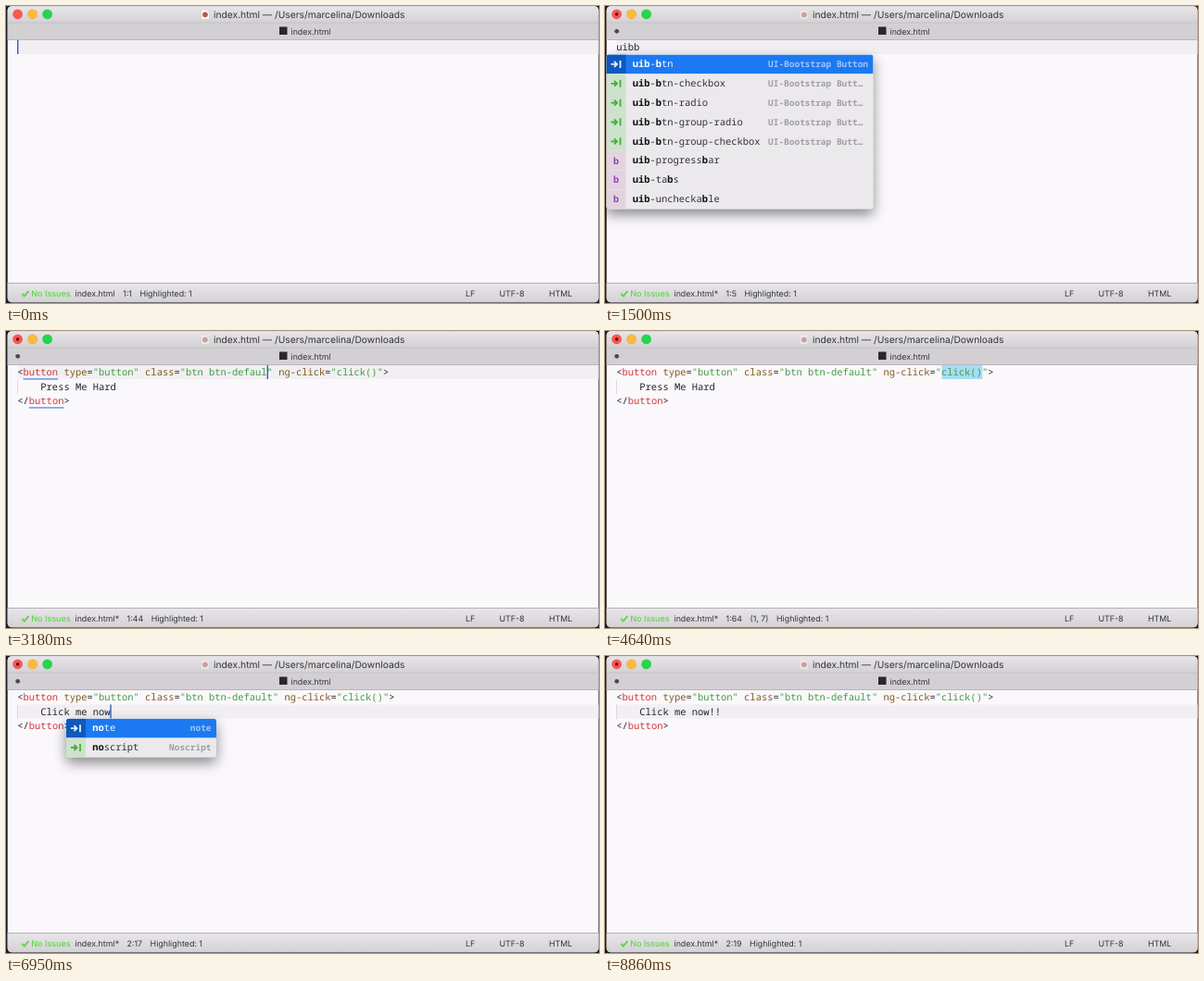
An HTML page that plays this animation: 640x321 px, repeating every 8900 ms.

```html
<!DOCTYPE html>
<html lang="en">
<head>
<meta charset="utf-8">
<title>Editor snippet demo</title>
<style>
  html, body { margin: 0; width: 100%; height: 100%; overflow: hidden; background: #1d1b1d; }
  svg { display: block; width: 640px; height: 321px; }
  text { white-space: pre; text-rendering: geometricPrecision; fill: #353337; font: 8.85px Inter, sans-serif; }
  .title { font-size: 10.25px; }
  .ok { font-size: 9px; font-weight: 500; fill: #5dd64b; }
  .code, .name { font: 500 10.45px "Noto Sans Mono", monospace; fill: #242328; }
  .tag { fill: #d2363a; }
  .attr { fill: #82591d; }
  .str { fill: #429c45; }
  .name { fill: #333136; }
  .name .hit { font-weight: 700; fill: #111; }
  .label { font: 600 9.47px "Noto Sans Mono", monospace; fill: #a19fa3; text-anchor: end; }
  .on .name { fill: #eef5ff; }
  .on .name .hit { fill: #fff; }
  .on .label { fill: #9cc5fa; }
  .letter { font: 700 10px "Noto Sans Mono", monospace; fill: #8a45b4; text-anchor: middle; }
  .panel { fill: #ebe9ec; filter: drop-shadow(0 6px 7px rgba(0, 0, 0, .45)); }
  .rows { clip-path: inset(0 round 3px); }
  .arrow { fill: none; stroke-width: 1.8; }
  .dirty { visibility: hidden; }
  .edited .dirty { visibility: visible; }
  .edited #doc { opacity: .45; }
</style>
</head>
<body>
<svg id="stage" viewBox="0 0 640 321">
  <defs>
    <linearGradient id="bar" x2="0" y2="1">
      <stop stop-color="#e8e6e8"/><stop offset="1" stop-color="#d3d1d3"/>
    </linearGradient>
    <clipPath id="window"><rect x="1.7" y=".3" width="637.8" height="320" rx="4.5"/></clipPath>
  </defs>
  <rect width="640" height="321" fill="#1d1b1d"/>
  <g clip-path="url(#window)">
    <rect width="640" height="321" fill="#faf8fb"/>
    <rect width="640" height="18" fill="url(#bar)"/>
    <rect y="18" width="640" height="18.5" fill="#d2d0d3"/>
    <rect y="17.7" width="640" height=".7" fill="#bebcbf"/>
    <rect y="36" width="640" height="1" fill="#b9b7ba"/>
    <rect y="299.5" width="640" height="21.5" fill="url(#bar)"/>
    <rect y="299" width="640" height="1" fill="#b3b1b4"/>
  </g>
  <g stroke-width=".5">
    <circle cx="12.6" cy="8.9" r="5" fill="#fc5652" stroke="#df4340"/>
    <circle cx="28.6" cy="8.9" r="5" fill="#fdbb38" stroke="#de9f34"/>
    <circle cx="44.6" cy="8.9" r="5" fill="#22d749" stroke="#1fbb3d"/>
  </g>
  <g id="doc">
    <path d="M210.5 4h6l2.8 2.8v7.7h-8.8z" fill="#fbfbfb" stroke="#c4c2c4" stroke-width=".5"/>
    <circle cx="214.9" cy="9.3" r="2.9" fill="#b8584a"/>
  </g>
  <text class="title" x="224" y="13">index.html — /Users/marcelina/Downloads</text>
  <rect x="295" y="22.5" width="8.5" height="8.5" fill="#29272a"/>
  <text x="307.5" y="30.5">index.html</text>
  <g class="dirty">
    <circle cx="12.6" cy="8.9" r="1.8" fill="#6b0f0d"/>
    <circle cx="12.7" cy="27.3" r="2.4" fill="#4c4a4d"/>
  </g>
  <g id="editor"></g>
  <path d="M17.3 311l2.5 2.5 4.5-5.4" fill="none" stroke="#5dd64b" stroke-width="1.9"/>
  <text class="ok" x="27.3" y="314">No Issues</text>
  <text id="status" x="74.5" y="314"></text>
  <text x="496" y="314">LF</text>
  <text x="532.5" y="314">UTF-8</text>
  <text x="586" y="314">HTML</text>
</svg>
<script>
const LOOP = 8900;
const LEFT = 12.3, TOP = 37, CHAR = 6.27, LINE = 15.5, ROW = 20.86;
const stage = document.getElementById('stage');
const editor = document.getElementById('editor');
const status = document.getElementById('status');

// Typing script: each step holds the text and the caret from its time on.
const steps = [];
const step = (at, lines, row = 0, col = 0, sel = 0) => steps.push({ at, lines, row, col, sel });
const markup = (style, label) => [
  `<button type="button" class="btn btn-${style}" ng-click="click()">`,
  '    ' + label,
  '</button>'
];
const OLD = 'Press Me Hard', NEW = 'Click me now', STYLE = 'default';

step(0, ['']);
[560, 700, 830, 1050].forEach((at, i) => step(at, ['uibb'.slice(0, i + 1)], 0, i + 1));
step(1800, markup(STYLE, OLD), 0, 44, 7);
for (let i = 1; i <= STYLE.length; i++) {
  step(2260 + 140 * i, markup(STYLE.slice(0, i), OLD), 0, 37 + i);
}
step(3700, markup(STYLE, OLD), 0, 63, 7);
step(5000, markup(STYLE, OLD), 1, 17, 13);
for (let i = 1; i <= NEW.length; i++) {
  step(5588 + 112 * i, markup(STYLE, NEW.slice(0, i)), 1, 4 + i);
}
step(7450, markup(STYLE, NEW + '!'), 1, 17);
step(7700, markup(STYLE, NEW + '!!'), 1, 18);

// Completion lists; a trailing space keeps cut labels aligned.
const CUT = 'UI-Bootstrap Butt… ';
const popups = [
  { from: 900, to: 1800, x: 1.5, y: 52.5, w: 288, items: [
    ['uib-btn', 'UI-Bootstrap Button'], ['uib-btn-checkbox', CUT], ['uib-btn-radio', CUT],
    ['uib-btn-group-radio', CUT], ['uib-btn-group-checkbox', CUT],
    ['uib-progressbar'], ['uib-tabs'], ['uib-uncheckable']] },
  { from: 5700, to: 5930, x: 9, y: 67.7, w: 161.5, hit: 'c', items: [
    ['canvas', 'Canvas'], ['cite', 'Citation'], ['code', 'Code'], ['caption', 'Caption'],
    ['col', 'Column'], ['colgroup', 'Column Group'], ['content', 'Content']] },
  { from: 6820, to: 7060, x: 65, y: 67.7, w: 162, hit: 'no', items: [
    ['note', 'note'], ['noscript', 'Noscript']] }
];

const rect = (x, y, w, h, fill) =>
  `<rect x="${x}" y="${y}" width="${w}" height="${h}" fill="${fill}"/>`;
const span = (cls, s) => `<tspan class="${cls}">${s}</tspan>`;
const colX = col => LEFT + col * CHAR;
const rowY = row => TOP + row * LINE;

const paint = line => line.replace(/<(\/?)(\w+)|([\w-]+)=("[^"]*")/g,
  (m, slash, tag, attr, str) => tag ? '&lt;' + slash + span('tag', tag)
                                    : span('attr', attr) + '=' + span('str', str));

function emphasize(name, query) {
  let i = 0;
  return [...name].map(c => c === query[i] ? (i++, span('hit', c)) : c).join('');
}

function drawPopup({ x, y, w, hit, items }, typed) {
  const h = items.length * ROW;
  const rows = items.map(([name, label], i) => {
    const top = y + i * ROW, mid = top + ROW / 2, on = i === 0;
    const side = on ? '#0f58bd' : label ? '#cde2cb' : '#e3d3df';
    const icon = label
      ? `<path class="arrow" stroke="${on ? '#e4efff' : '#43ae3f'}"
           d="M${x + 5} ${mid}h6.5m-3-3l3 3l-3 3M${x + 15} ${mid - 4}v8"/>`
      : `<text class="letter" x="${x + 10.5}" y="${mid + 3.3}">b</text>`;
    return `<g class="${on ? 'on' : ''}">
      ${rect(x, top, w, ROW, on ? '#1c79f2' : '#ebe9ec')}${rect(x, top, 21, ROW, side)}${icon}
      <text class="name" x="${x + 28.2}" y="${mid + 3.2}">${emphasize(name, hit || typed)}</text>
      <text class="label" x="${x + w - 5.5}" y="${mid + 3.2}">${label || ''}</text></g>`;
  }).join('');
  return `<rect class="panel" x="${x}" y="${y}" width="${w}" height="${h}" rx="3"/>
    <g class="rows">${rows}</g>`;
}

function drawEditor(t, s) {
  const { lines, row, col, sel } = s;
  const idle = t - s.at - 300;
  const caret = !sel && (idle < 0 || Math.floor(idle / 400) % 2 === 1);
  const popup = popups.find(p => t >= p.from && t < p.to);
  const y = rowY(row);
  let out = sel
    ? rect(colX(col - sel), y, sel * CHAR, 15, '#a7dcf4')
    : rect(LEFT, y, 639.5 - LEFT, 15, '#f1eff2');
  if (lines.length > 1) {
    out += rect(LEFT, rowY(1), .7, LINE, '#cfcdd0');
    if (row === 0 && !sel) {
      out += rect(colX(1), 51.4, 6 * CHAR, 1.1, '#3f70dc') + rect(colX(2), 82.4, 6 * CHAR, 1.1, '#3f70dc');
    }
  }
  lines.forEach((line, i) => {
    out += `<text class="code" x="${LEFT}" y="${rowY(i) + 11}">${paint(line)}</text>`;
  });
  if (caret) out += rect(colX(col) - .3, y, 1.4, 15, '#2f5fc9');
  if (popup) out += drawPopup(popup, lines[0]);
  return out;
}

function drawStatus({ at, row, col, sel }) {
  const parts = [at ? 'index.html*' : 'index.html', `${row + 1}:${col + 1}`];
  if (sel) parts.push(`(1, ${sel})`);
  parts.push('Highlighted: 1');
  return parts.map((p, i) => `<tspan dx="${i ? 8.5 : 0}">${p}</tspan>`).join('');
}

let shown;
function frame() {
  const t = performance.now() % LOOP;
  const now = steps.filter(s => s.at <= t).pop();
  const html = drawEditor(t, now);
  if (html !== shown) {
    shown = html;
    editor.innerHTML = html;
    status.innerHTML = drawStatus(now);
    stage.classList.toggle('edited', now.at > 0);
  }
  requestAnimationFrame(frame);
}
frame();
</script>
</body>
</html>
```
